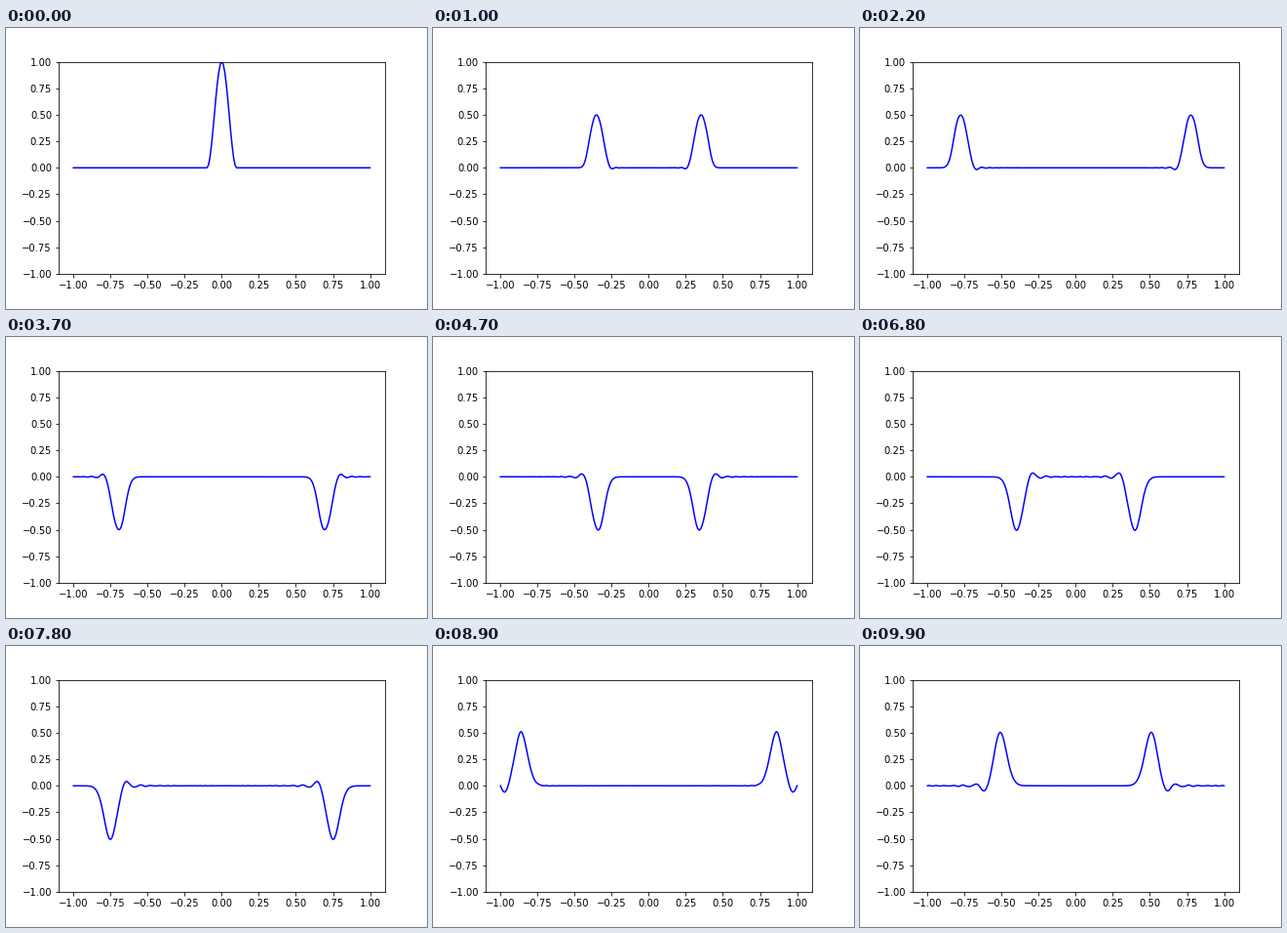
Write a matplotlib script that moves like this. It is 432 px wide and 288 px high and loops after 10000 ms.

```python
import numpy as np
import matplotlib.pyplot as plt
from matplotlib.animation import FuncAnimation

FRAMES = 100
INTERVAL = 100       # ms
STEPS = 5            # solver steps per frame
COURANT2 = 0.5       # (c dt / dx)^2

x = np.linspace(-1, 1, 201)


def accel(u):
    """Discrete second difference, zero at the fixed ends."""
    a = np.zeros_like(u)
    a[1:-1] = u[2:] - 2 * u[1:-1] + u[:-2]
    return COURANT2 * a


def solve():
    """Leapfrog solution of the wave equation, sampled once per frame."""
    u = np.where(np.abs(x) < 0.1, 0.5 * (1 + np.cos(10 * np.pi * x)), 0.0)
    prev = u + 0.5 * accel(u)    # starts at rest
    states = []
    for _ in range(FRAMES):
        states.append(u)
        for _ in range(STEPS):
            prev, u = u, 2 * u - prev + accel(u)
    return states


states = solve()

fig, ax = plt.subplots(figsize=(6, 4), dpi=72)
fig.subplots_adjust(left=0.125, right=0.9, bottom=0.125, top=0.88)
line, = ax.plot(x, states[0], "b", lw=1.5)
ax.set_ylim(-1, 1)


def update(i):
    line.set_ydata(states[i])
    return line,


anim = FuncAnimation(fig, update, frames=FRAMES, interval=INTERVAL,
                     repeat=True, repeat_delay=0)
plt.show()
```
